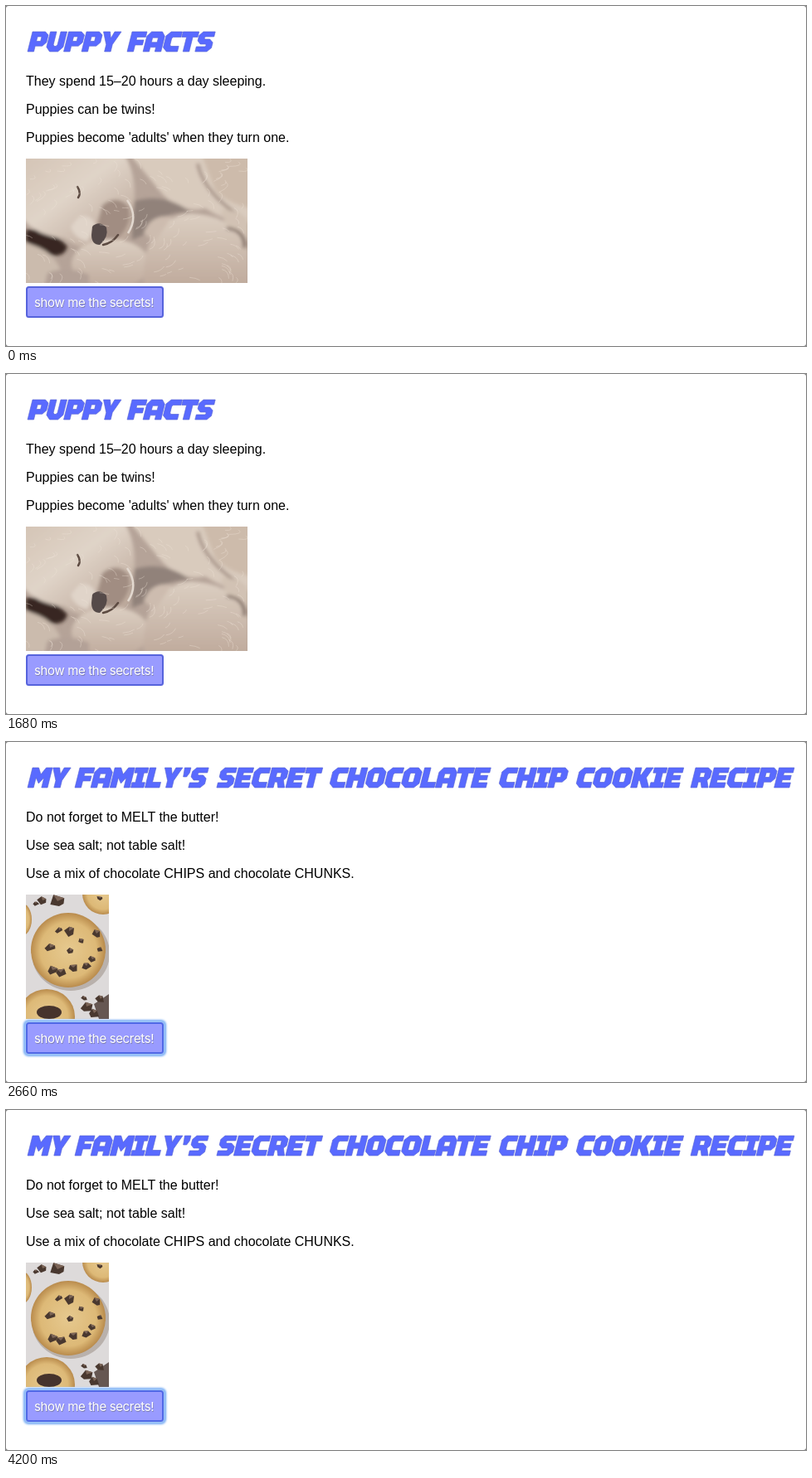
Write an HTML page that moves like this. It is 964x410 px and loops after 4270 ms.

```html
<!DOCTYPE html>
<html lang="en">
<head>
<meta charset="utf-8">
<title>Puppy facts</title>
<style>
  html, body { margin: 0; width: 100%; height: 100%; overflow: hidden; background: #fff; }
  svg { display: block; width: 964px; height: 410px; }
  .copy { font: 16px "Liberation Sans", Arial, sans-serif; fill: #000; }
  .label { font: 400 15px Inter, Roboto, sans-serif; letter-spacing: -.35px; fill: #fff; }
  .title { fill: #596aff; stroke: #5662d2; stroke-width: .6; fill-rule: evenodd; }
</style>
</head>
<body>
<svg viewBox="0 0 964 410" xmlns="http://www.w3.org/2000/svg">
  <defs>
    <clipPath id="puppyClip"><rect x="24" y="184" width="267" height="150"/></clipPath>
    <clipPath id="cookieClip"><rect x="24" y="184" width="100" height="150"/></clipPath>
    <filter id="soft" x="-20%" y="-20%" width="140%" height="140%"><feGaussianBlur stdDeviation="2.2"/></filter>
    <filter id="glow" x="-10%" y="-30%" width="120%" height="160%"><feGaussianBlur stdDeviation=".8"/></filter>
    <filter id="fine"><feGaussianBlur stdDeviation=".6"/></filter>
    <linearGradient id="head" x1="0" y1="0" x2=".9" y2="1">
      <stop offset="0" stop-color="#d3c3b4"/><stop offset=".45" stop-color="#e0d4c8"/><stop offset="1" stop-color="#b9a496"/>
    </linearGradient>
    <linearGradient id="coat" x1="0" y1="0" x2="0" y2="1">
      <stop offset="0" stop-color="#ddd0c3"/><stop offset="1" stop-color="#c2af a1"/>
    </linearGradient>
    <linearGradient id="belly" x1="0" y1="0" x2="0" y2="1">
      <stop offset="0" stop-color="#dccfc2"/><stop offset="1" stop-color="#bfaa9c"/>
    </linearGradient>
    <radialGradient id="dough">
      <stop offset="0" stop-color="#e6c98f"/><stop offset=".75" stop-color="#ddb977"/><stop offset="1" stop-color="#b98b4c"/>
    </radialGradient>
  </defs>

  <path fill="#777" d="M0 0H3A3 3 0 0 0 0 3ZM964 0V3A3 3 0 0 0 961 0ZM0 410V407A3 3 0 0 0 3 410ZM964 410H961A3 3 0 0 0 964 407Z"/>

  <g id="facts">
    <g class="title" data-words="PUPPY@25 FACTS@145"></g>
    <g class="copy">
      <text x="24" y="96">They spend 15–20 hours a day sleeping.</text>
      <text x="24" y="130">Puppies can be twins!</text>
      <text x="24" y="164">Puppies become 'adults' when they turn one.</text>
    </g>
    <g clip-path="url(#puppyClip)">
      <rect x="24" y="184" width="267" height="150" fill="#b5a398"/>
      <g filter="url(#soft)">
        <path fill="#d9cbbd" d="M150 180H296V262Q268 262 240 244Q205 252 178 214Z"/>
        <path fill="#cdbbab" d="M236 180H296V244Q270 240 252 222Z"/>
        <path fill="none" stroke="#a8958a" stroke-width="4" d="M231 190Q238 226 288 258"/>
        <path fill="#91827a" d="M152 236Q190 224 222 248Q186 248 166 276L152 282Z"/>
        <path fill="#382720" d="M24 270Q54 268 74 290Q70 304 54 300L24 284Z"/>
        <path fill="url(#head)" d="M18 178H142Q160 206 153 250Q152 284 126 292Q94 298 70 280Q36 278 18 254Z"/>
        <path fill="#a18d82" d="M116 240Q134 226 148 242Q154 266 130 284Q112 284 110 262Z"/>
        <path fill="#e0d4c9" d="M88 254Q104 250 108 266L98 284Q82 280 78 266Z"/>
        <ellipse cx="126" cy="311" rx="47" ry="30" fill="url(#belly)"/>
        <path fill="#cbbbad" d="M18 286Q52 288 66 318L96 336H18Z"/>
        <path fill="#b3a197" d="M50 322Q72 312 100 324V338H46Z"/>
        <path fill="url(#belly)" d="M166 338Q162 258 222 250Q278 252 292 296V338Z"/>
        <path fill="#cdbcaf" d="M166 274Q174 250 200 254L180 284Z"/>
        <path fill="#d2c2b4" d="M258 246Q278 244 292 260V286Q286 268 266 266Z"/>
        <path fill="none" stroke="#756259" stroke-width="3" d="M266 268Q288 270 287 292"/>
      </g>
      <g filter="url(#fine)">
        <path fill="#554a49" d="M104 266Q112 258 121 267Q124 279 113 288Q103 288 103 276Z"/>
        <path fill="none" stroke="#5d4b42" stroke-width="2.5" stroke-linecap="round" d="M86 218Q91 225 87 231M117 288Q128 286 135 276"/>
        <path fill="none" stroke="#e2d8cf" stroke-width="2.5" d="M146 234Q160 254 147 274"/>
        <path id="fur" fill="none" stroke="#efe5da" stroke-opacity=".35"/>
      </g>
    </g>
  </g>

  <g id="recipe">
    <g class="title" data-words="MY@25 FAMILY'S@82 SECRET@253 CHOCOLATE@388 CHIP@592 COOKIE@685 RECIPE@824"></g>
    <g class="copy">
      <text x="24" y="96">Do not forget to MELT the butter!</text>
      <text x="24" y="130">Use sea salt; not table salt!</text>
      <text x="24" y="164">Use a mix of chocolate CHIPS and chocolate CHUNKS.</text>
    </g>
    <g clip-path="url(#cookieClip)">
      <rect x="24" y="184" width="100" height="150" fill="#dddada"/>
      <g filter="url(#fine)">
        <ellipse cx="78" cy="255" rx="47" ry="45" fill="#b9b1ac"/>
        <ellipse cx="75" cy="251" rx="45" ry="45" fill="url(#dough)"/>
        <circle cx="117" cy="183" r="25" fill="url(#dough)"/>
        <ellipse cx="18" cy="214" rx="13" ry="20" fill="url(#dough)"/>
        <ellipse cx="49" cy="331" rx="34" ry="33" fill="url(#dough)"/>
        <ellipse cx="52" cy="326" rx="15" ry="8" fill="#46332c"/>
        <path fill="#665752" d="M106 316L124 304V334H112Z"/>
        <g id="chunks"></g>
      </g>
    </g>
  </g>

  <g id="ring">
    <rect x="22.5" y="336.5" width="169" height="41" rx="4.5" fill="none" stroke="#74abf4" stroke-width="3.2" filter="url(#glow)"/>
  </g>
  <rect id="button" x="25" y="339" width="164" height="36" rx="2.5" fill="#999bff" stroke="#5663dc" stroke-width="2"/>
  <text class="label" x="34.6" y="363.8" style="fill:#555;fill-opacity:.45">show me the secrets!</text>
  <text class="label" x="34" y="363">show me the secrets!</text>
</svg>
<script>
const LOOP = 4270, FOCUS_AT = 1890, SWAP_AT = 2030;
const $ = id => document.getElementById(id);

// Display capitals: advance width and outline, 24 units tall.
const glyphs = {
  A: [22.7, "M5 0H18L22.2 5.5V24H14.8V18.8H8V24H.6V5.5ZM8 7.2V12.8H14.8V7.2Z"],
  C: [20, "M6 0H19.3V6.5H10L8.5 8V16L10 17.5H19.3V24H6L1 19V5Z"],
  E: [20.3, "M1 0H19.3V6H8.5V9.3H18V14.7H8.5V18H19.3V24H1Z"],
  F: [19.5, "M1 0H19V6.5H8.5V10H17.5V16H8.5V24H1Z"],
  H: [23, "M1 0H8.5V8.7H14.5V0H22V24H14.5V15.3H8.5V24H1Z"],
  I: [16.5, "M.5 0H16V6.2H12V17.8H16V24H.5V17.8H4.5V6.2H.5Z"],
  K: [23.3, "M1 0H8.5V8.5H10L14 0H22.5L17 12 23 24H14.5L10 15.5H8.5V24H1Z"],
  L: [19, "M1 0H8.5V17.5H18.5V24H1Z"],
  M: [25.7, "M1 0H8.5L13 8 17.5 0H25V24H17.8V12L13 19 8.2 12V24H1Z"],
  O: [23.3, "M6.5 0H17L22.3 5V19L17 24H6.5L1 19V5ZM8.5 7.5V16.5L9.5 17.5H13.8L14.8 16.5V7.5L13.8 6.5H9.5Z"],
  P: [21.5, "M1 0H16.5L21 4V13L17 17.3H8.5V24H1ZM8.5 6V11.5H13.5V6Z"],
  R: [22.3, "M1 0H16.5L21.5 4V12L18.5 15 22 24H14L11.5 17.2H8.5V24H1ZM8.5 6V11.5H14V6Z"],
  S: [20.3, "M5 0H19.3V6H8.8L8.2 7.5 8.8 9H15L19.5 13V19.5L15 24H.9V18H11.6L12.2 16.5 11.6 15H5L.9 11V4.5Z"],
  T: [19.7, "M.2 0H19.5V6.5H13.5V24H6V6.5H.2Z"],
  U: [22, "M1 0H8.5V15.5L10 17.5H12L13.5 15.5V0H21V18.5L16 24H6L1 18.5Z"],
  Y: [21.5, "M0 0H8L10.8 8 13.5 0H21.5L14.6 15.5V24H7.1V15.5Z"],
  "'": [12, "M2.5 0H10V6L7.5 11H3.5Z"]
};

function add(parent, tag, attrs) {
  const el = document.createElementNS("http://www.w3.org/2000/svg", tag);
  for (const key in attrs) el.setAttribute(key, attrs[key]);
  return parent.appendChild(el);
}

function setTitle(group) {
  const words = group.dataset.words.split(" ").map(w => w.split("@"));
  group.setAttribute("role", "img");
  group.setAttribute("aria-label", words.map(w => w[0]).join(" "));
  for (const [word, start] of words) {
    let x = +start;
    for (const letter of word) {
      const [advance, d] = glyphs[letter];
      add(group, "path", { d, transform: `matrix(1 0 -.25 1 ${x + 6} 31)` });
      x += advance;
    }
  }
}
document.querySelectorAll(".title").forEach(setTitle);

let seed = 7;
const random = () => (seed = seed * 16807 % 2147483647) / 2147483647;

let strands = "";
for (let i = 0; i < 130; i++) {
  const x = 24 + random() * 267, y = 184 + random() * 150;
  const turn = Math.sin(x / 38) + Math.cos(y / 30) + .8;
  const length = 6 + random() * 9;
  strands += `M${x} ${y}q${length * .6} ${turn * 2} ${length * Math.cos(turn)} ${length * Math.sin(turn)}`;
}
$("fur").setAttribute("d", strands);

// Chocolate pieces: centre and radius.
const pieces = [
  [62, 192, 10], [44, 191, 6], [36, 195, 4], [113, 188, 4],
  [76, 228, 8], [64, 227, 5], [53, 248, 6], [77, 252, 5], [90, 240, 4],
  [109, 231, 6], [56, 275, 7], [66, 278, 7], [81, 272, 7], [97, 270, 6],
  [104, 262, 5], [113, 250, 4], [97, 319, 8], [94, 309, 4], [106, 327, 7], [114, 310, 6]
];
for (const [x, y, r] of pieces) {
  const points = [...Array(5).keys()].map(i => {
    const a = i * 1.257 + random(), d = r * (.75 + random() * .4);
    return [x + d * Math.cos(a), y + d * .8 * Math.sin(a)];
  });
  add($("chunks"), "polygon", { points: points.join(" "), fill: "#49382f" });
  add($("chunks"), "polygon", { points: [points[3], points[4], [x, y]].join(" "), fill: "#7c6557" });
}

function show(id, on) {
  $(id).setAttribute("visibility", on ? "visible" : "hidden");
}

function draw(now) {
  const t = now % LOOP, focused = t >= FOCUS_AT, swapped = t >= SWAP_AT;
  show("facts", !swapped);
  show("recipe", swapped);
  show("ring", focused);
  $("button").setAttribute("stroke", focused ? "#5069e6" : "#5663dc");
}

const began = performance.now();
function tick() {
  draw(performance.now() - began);
  requestAnimationFrame(tick);
}
tick();
</script>
</body>
</html>
```
